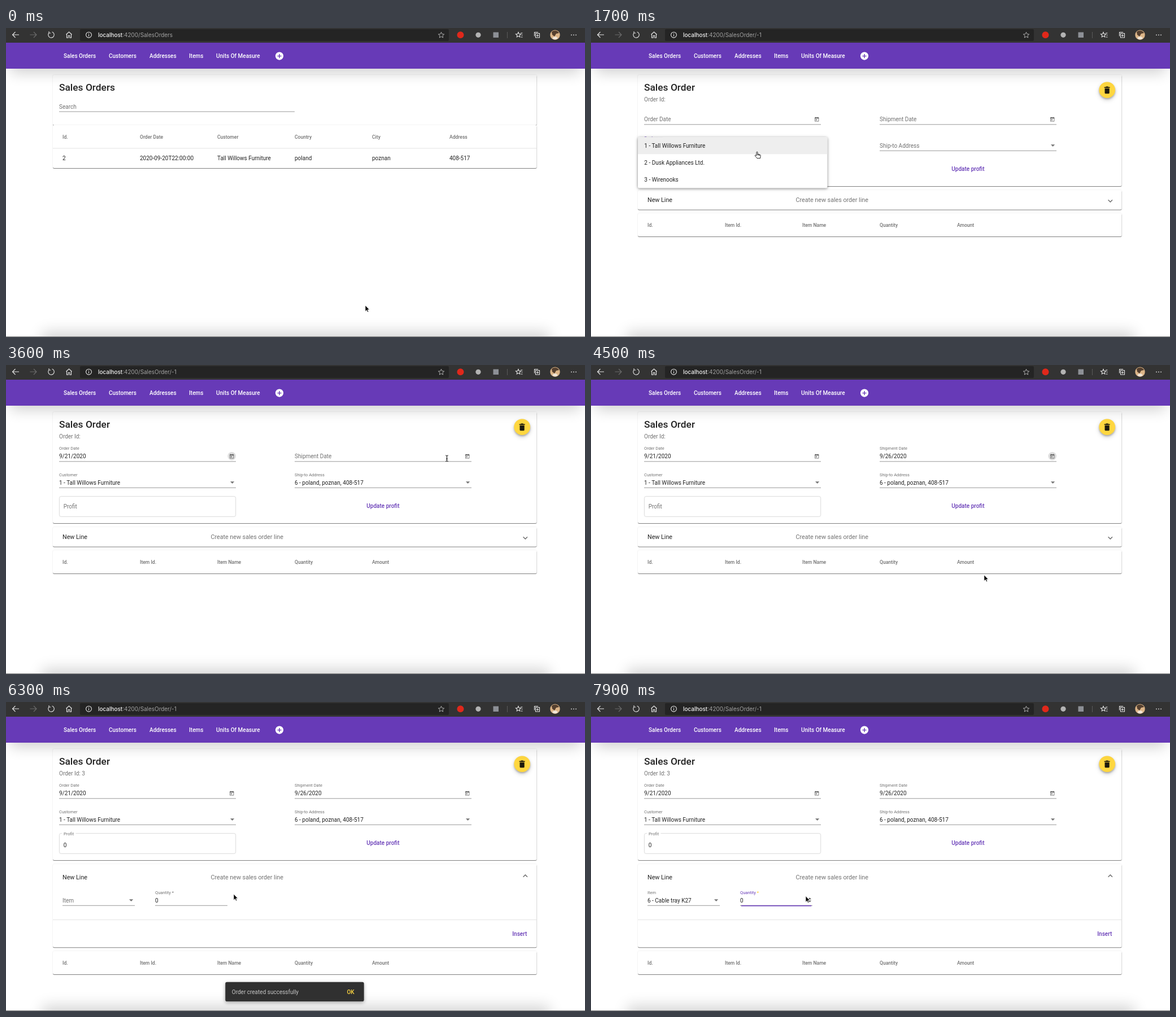
Write an HTML page that moves like this. It is 1025 px wide and 547 px high and loops after 8 s.

```html
<!DOCTYPE html>
<html lang="en">
<head>
<meta charset="utf-8">
<title>Sales orders</title>
<style>
html, body { margin: 0; width: 100%; height: 100%; overflow: hidden; background: #fff; }
svg { display: block; width: 1025px; height: 547px; }
text { font-family: Roboto, sans-serif; fill: rgba(0,0,0,.87); white-space: pre; }
.url { font-family: Inter, sans-serif; fill: #a3a3a3; }
.host { fill: #f4f4f4; font-weight: 500; }
.dim { fill: rgba(0,0,0,.56); }
.mid { font-weight: 500; }
.white { fill: #fff; }
.violet { fill: #673ab7; }
.amber { fill: #ffd740; }
.pale { fill: rgba(255,255,255,.72); }
.center { text-anchor: middle; }
.card { fill: #fff; filter: drop-shadow(0 1.4px .6px rgba(0,0,0,.46)) drop-shadow(0 .5px .9px rgba(0,0,0,.1)); }
.pop { fill: #fff; filter: drop-shadow(0 1.5px 2px rgba(0,0,0,.34)) drop-shadow(0 1px 3px rgba(0,0,0,.16)); }
.fab { filter: drop-shadow(0 2px 1.6px rgba(0,0,0,.24)) drop-shadow(0 3px 3.5px rgba(0,0,0,.18)); }
.glow { filter: blur(13px); }
.rule { fill: rgba(0,0,0,.45); }
.ripple { fill: #673ab7; display: none; transform-box: fill-box; transform-origin: center; }
.mark { fill: #757575; }
.focus .ripple { display: inline; }
.focus .small, .focus .mark { fill: #673ab7; }
.focus .star { fill: #ffc400; }
.line { fill: none; stroke: #e8e8e8; stroke-width: 1.1; }
</style>
</head>
<body>
<svg id="stage" viewBox="0 0 1025 547"></svg>
<script>
const END = 8000, STEP = 100;
const stage = document.getElementById('stage');
const client = 'Tall Willows Furniture', place = '408-517';

const text = (x, mid, s, size = 10, cls = '') =>
  `<text x="${x}" y="${mid + .355 * size}" font-size="${size}" class="${cls}">${s}</text>`;
const title = s => text(94, 104.9, s, 17.35, 'mid');
const box = (x, y, w, h, cls, more = '') =>
  `<rect x="${x}" y="${y}" width="${w}" height="${h}" class="${cls}" ${more}/>`;
const path = (d, more = '') => `<path d="${d}" ${more}/>`;
const dot = (x, y, r, fill) => `<circle cx="${x}" cy="${y}" r="${r}" fill="${fill}"/>`;
const on = (times, ...parts) => `<g data-on="${times}">${parts.join('')}</g>`;
const popup = (from, to, ...parts) => `<g data-on="${from} ${to + STEP}" data-pop="${from} ${to}">${parts.join('')}</g>`;
const cells = (names, mid, size = 8.57, cls = 'dim mid') =>
  names.map((s, i) => text(100 + 137 * i, mid, s, size, cls)).join('');

function field({ x, w, base, label, value, floatAt, valueAt = floatAt, focus = '', arrow = true, star = '' }) {
  const mark = star && `<tspan class="star"> ${star}</tspan>`;
  return `<g data-focus="${focus}">` +
    on(`0 ${floatAt}`, text(x, base - 9.5, label, 10, 'dim')) +
    on(`${floatAt} ${END}`, text(x, base - 23.5, label + mark, 7.5, 'dim small')) +
    on(`${valueAt} ${END}`, text(x, base - 9.5, value)) +
    box(x, base - .7, w, .9, 'rule') + box(x, base - .6, w, 1.6, 'ripple') +
    (arrow ? path(`M${x + w - 10} ${base - 11.2}h7.2l-3.6 3.7z`, 'class="mark"') : '') + '</g>';
}

function options(x, y, w, from, to, names, hover) {
  return popup(from, to,
    box(x, y, w, 30 * names.length, 'pop', 'rx="2.5"'),
    box(x, y + 30 * hover, w, 30, '', 'fill="#eee"'),
    ...names.map((s, i) => text(x + 11.3, y + 15.5 + 30 * i, s)));
}

function calendar(x, day, from, to) {
  const col = i => x + 20 + 28.57 * i;
  let s = box(x, 172, 211.4, 253, 'pop', 'rx="2.5"') +
    text(x + 17, 200, 'SEP 2020', 10, 'mid') +
    path(`M${x + 67} 198.5h7l-3.5 3.6z`, 'class="mark"') +
    path(`M${x + 163} 196.5l-3.5 3.5 3.5 3.5M${x + 188} 196.5l3.5 3.5-3.5 3.5`, 'fill="none" stroke="#666" stroke-width="1.3"') +
    box(x, 241, 211.4, .7, '', 'fill="#e0e0e0"') +
    text(x + 14, 261, 'SEP', 9.3, 'dim mid');
  [...'SMTWTFS'].forEach((d, i) => s += text(col(i), 231, d, 7.86, 'dim center'));
  for (let d = 1; d <= 30; d++) {
    const cx = col((d + 1) % 7), cy = 290 + 28.57 * Math.floor((d + 1) / 7);
    if (d === day) s += dot(cx, cy, 13, '#673ab7');
    s += text(cx, cy, d, 9.3, d === day ? 'center white' : 'center');
  }
  return popup(from, to, s);
}

const toggle = (x, times) => on(times, dot(x, 161.3, 7.3, '#dedede')) +
  path(`M${x - 3.2} 159h6.4v6.2h-6.4z`, 'fill="none" stroke="#666" stroke-width=".8"') +
  path(`M${x - 3.6} 158.3h7.2v1.9h-7.2zM${x - 2.4} 157.4h.9v1h-.9zM${x + 1.5} 157.4h.9v1h-.9zM${x - 1.9} 161.5h2v2h-2z`, 'fill="#666"');

const url = s => `<text x="163" y="16" font-size="9.95" class="url"><tspan class="host">localhost</tspan>:4200/${s}</text>`;

const browser = box(0, 0, 1025, 26, '', 'fill="#333"') +
  box(131, 2, 653, 21, '', 'rx="2" fill="#242424"') +
  on('0 700', url('SalesOrders')) + on(`700 ${END}`, url('SalesOrder/-1')) +
  path('M23 12H11.5m5-5-5 5 5 5M76.5 8.2a5.2 5.2 0 1 0 5.2-1.1M76 6v3h3.2M106.5 11.5l5-4.5 5 4.5M107.5 11v6.2h2.7v-3.7h2.6v3.7h2.7V11', 'class="line"') +
  path('M42.5 12H54m-5-5 5 5-5 5', 'class="line" style="stroke:#6d6d6d"') +
  '<circle cx="146.5" cy="12.2" r="4.9" class="line"/>' + path('M146.5 11.5v3.3M146.5 9.3v1.2', 'class="line"') +
  path('M770.5 7.3l1.5 3.4 3.7.4-2.8 2.4.8 3.6-3.2-1.9-3.2 1.9.8-3.6-2.8-2.4 3.7-.4z', 'class="line" style="stroke:#bbb;stroke-width:.9"') +
  dot(804.5, 12.3, 6, '#e0281b') + dot(836, 12.3, 4.6, '#b3b3b3') +
  box(862.5, 7.5, 9.5, 9.5, '', 'fill="#8d9096"') + box(887, 7, .8, 11, '', 'fill="#666"') +
  path('M907 7.5l1.3 3 3.2.3-2.3 2.2.5 3-2.7-1.6-2.7 1.6.6-3-2.4-2.2 3.2-.3zM911 9h3.5M912.5 12.5h2M911.5 16h3', 'class="line"') +
  path('M937.5 9.5h7v7.5h-7zM935.5 14.5V7.5h6.5M941 11v4.5M938.8 13.2h4.4', 'class="line"') +
  dot(972, 12.2, 8.7, '#dcb588') + path('M966 7c4-4 11-3 13 2l-5 1-3 5-4-3z', 'fill="#55402f"') + path('M967 18c3-4 7-4 10 0-3 3-7 3-10 0z', 'fill="#f0e6d8"') +
  [1001, 1005, 1009].map(x => dot(x, 12.3, .9, '#eee')).join('');

const nav = box(0, 26, 1025, 46, 'violet') +
  [[102, 'Sales Orders'], [182, 'Customers'], [254, 'Addresses'], [324, 'Items'], [372, 'Units Of Measure']]
    .map(([x, s]) => text(x, 49.4, s, 10, 'mid white')).join('') +
  dot(484, 49.6, 7.1, '#fff') + path('M484 46v7.2M480.4 49.6h7.2', 'stroke="#673ab7" stroke-width="1.45"');

const list = on('0 700',
  box(83, 83, 856.5, 89, 'card', 'rx="2.5"'), box(83, 172, 856.5, 76, 'card', 'rx="2.5"'),
  title('Sales Orders'), text(94, 139, 'Search', 10, 'dim'),
  box(94, 147.6, 417, .9, 'rule'), box(83, 212.6, 856.5, .8, '', 'fill="#dcdcdc"'),
  cells(['Id.', 'Order Date', 'Customer', 'Country', 'City', 'Address'], 192.7),
  cells(['2', '2020-09-20T22:00:00', client, 'poland', 'poznan', place], 230.7, 10, ''));

const head = box(83, 83, 856.5, 197, 'card', 'rx="2.5"') + title('Sales Order') +
  on('0 5000', text(94, 126.5, 'Order Id:', 10, 'dim')) + on(`5000 ${END}`, text(94, 126.5, 'Order Id: 3', 10, 'dim')) +
  '<circle cx="913.7" cy="109.7" r="14.3" class="amber fab"/>' +
  path('M909.5 106.7h8.2v8q0 1.5-1.5 1.5h-5.2q-1.5 0-1.5-1.5zM908.6 104.5h2.5l.8-.9h3.4l.8.9h2.5v1.4h-10z', 'fill="#1d1a0c"') +
  field({ x: 94, w: 313, base: 171.1, label: 'Order Date', value: '9/21/2020', floatAt: 3200, arrow: false }) +
  field({ x: 511, w: 313, base: 171.1, label: 'Shipment Date', value: '9/26/2020', floatAt: 4200, arrow: false }) +
  toggle(399.7, '3200 3800') + toggle(816.7, '4200 4900') +
  field({ x: 94, w: 313, base: 217.5, label: 'Customer', value: '1 - ' + client, floatAt: 1400, valueAt: 1900, focus: '1400 2100 4900 5500' }) +
  field({ x: 511, w: 313, base: 217.5, label: 'Ship-to Address', value: `6 - poland, poznan, ${place}`, floatAt: 2100, valueAt: 2300, focus: '2100 2800' }) +
  box(94.4, 232.6, 312.3, 35.8, '', 'rx="3" fill="none" stroke="#d6d6d6" stroke-width=".9"') +
  on('0 5000', text(101.7, 250, 'Profit', 10, 'dim')) +
  on(`5000 ${END}`, box(99, 231, 24.5, 3, 'white'), text(102, 233, 'Profit', 7.5, 'dim'), text(101.7, 253, '0')) +
  text(638.3, 249.5, 'Update profit', 10, 'mid violet');

const line = box(83, 287, 856.5, 34.5, 'card', 'id="line" rx="2.5"') +
  on('4900 5500', box(83, 287, 856.5, 34.5, '', 'rx="2.5" fill="#ededed"')) +
  `<g id="lineHead">${text(100, 304, 'New Line', 10.71)}${text(362.5, 304, 'Create new sales order line', 10.71, 'dim')}</g>` +
  path('M-3.7-1.9 0 1.8 3.7-1.9', 'id="chevron" fill="none" stroke="#666" stroke-width="1.3"') +
  '<clipPath id="clip"><rect id="clipBox" x="83" y="325" width="857"/></clipPath><g id="lineBody" clip-path="url(#clip)">' +
  field({ x: 100, w: 128, base: 360.5, label: 'Item', value: '6 - Cable tray K27', floatAt: 6700, valueAt: 7000, focus: '6700 7700' }) +
  field({ x: 264, w: 128, base: 360.5, label: 'Quantity', value: '0', floatAt: 0, focus: `7700 ${END}`, arrow: false, star: '*' }) +
  on(`7700 ${END}`, path('M384.5 349.3h5.4l-2.7-3zM384.5 351.5h5.4l-2.7 3z', 'fill="#555"')) +
  box(83, 385, 856.5, .8, '', 'fill="#dedede"') + text(896.3, 410, 'Insert', 10, 'mid violet') + '</g>' +
  `<g id="table">${box(83, 328, 856.5, 41, 'card', 'rx="2.5"')}${cells(['Id.', 'Item Id.', 'Item Name', 'Quantity', 'Amount'], 348.5)}</g>`;

const snack = `<g id="snack">${box(388.3, 495.7, 245.4, 34.3, '', 'rx="2.8" fill="#303030" style="filter:drop-shadow(0 2px 3px rgba(0,0,0,.35))"')}` +
  text(399.8, 513, 'Order created successfully', 10, 'pale') + text(603.4, 513, 'OK', 10, 'mid amber') + '</g>';

const cursors = {
  arrow: path('M0 0v10.7l2.5-2.3 1.6 3.6 1.7-.8-1.6-3.4h3.2z', 'fill="#000" stroke="#fff" stroke-width=".7"'),
  hand: path('M-1 .8C-.3-.3 1 0 1 1.2V4.3l3.5.8c1.4.3 1.9 1 1.7 2.4L5.5 11.7H0C-1 9.8-2.8 8.6-3.7 7.1-4 6-2.6 5.5-1.9 6.3l.9.8zM1 4.3v2M2.8 4.8v2M4.5 5.2v1.8', 'fill="#fff" stroke="#000" stroke-width=".85"'),
  beam: path('M-2.2-5.3q2.2 0 2.2 1.3V4q0 1.3-2.2 1.3M2.2-5.3Q0-5.3 0-4V4Q0 5.3 2.2 5.3M-1.3.8h2.6', 'fill="none" stroke="#000" stroke-width="1"')
};
const hand = '500 900 1300 2000 2100 2400 2700 3300 3800 4300 4800 5700 6500 7300';
const beam = '3500 3800 7500 7700';

stage.innerHTML = list + on(`700 ${END}`, head, line) +
  box(64, 538, 898, 40, 'glow', 'opacity=".17"') + box(0, 546, 1025, 1, '', 'fill="#777"') +
  box(8, 40, 1009, 39, 'glow', 'opacity=".19"') + browser + nav +
  options(83, 193.3, 335.4, 1400, 1900, ['1 - ' + client, '2 - Dusk Appliances Ltd.', '3 - Wirenooks'], 0) +
  options(500, 193.3, 335.4, 2100, 2300, [`6 - poland, poznan, ${place}`], 0) +
  calendar(94, 21, 2800, 3200) + calendar(511, 26, 3800, 4200) +
  options(88.7, 336, 150.6, 6700, 7000, ['1 - Desk lamp', '3 - Wall clock', '4 - Paper bin', '6 - Cable tray K27'], 3) +
  snack + '<g id="cursor"></g>';

const track = [
  [0, 636, 491], [600, 484, 49], [800, 484, 49], [1400, 300, 208], [1700, 294, 219], [1900, 294, 213],
  [2100, 640, 207], [2300, 600, 207], [2500, 446, 160], [2700, 399, 161], [2800, 399, 161], [3200, 142, 376],
  [3300, 142, 376], [3600, 780.5, 165.3], [3800, 816, 161], [3900, 816, 161], [4200, 702, 376], [4400, 702, 376],
  [5100, 592, 297.3], [5400, 592, 297.3], [6300, 403, 340], [6600, 165, 350], [6700, 165, 350], [7000, 150, 446],
  [7200, 150, 446], [7700, 380, 343.5], [END, 380, 343.5]
];

const id = name => document.getElementById(name);
const all = key => [...stage.querySelectorAll(`[data-${key}]`)].map(el => [el, el.dataset[key].split(' ').map(Number)]);
const timed = all('on'), pops = all('pop'), focusable = all('focus');
const clamp = v => Math.max(0, Math.min(1, v));
const ease = v => v * v * (3 - 2 * v);
const set = (el, name, v) => el.setAttribute(name, v);

// Start of the window that holds t, or -1.
function since(spans, t) {
  for (let i = 0; i + 1 < spans.length; i += 2) if (t >= spans[i] && t < spans[i + 1]) return spans[i];
  return -1;
}
const within = (s, t) => since(s.split(' ').map(Number), t) >= 0;

function pointer(t) {
  const i = track.findIndex(p => p[0] > t), [a, x, y] = track[i - 1], [b, u, v] = track[i];
  const k = ease((t - a) / (b - a));
  return [x + (u - x) * k, y + (v - y) * k];
}

let shape = '';
function draw(t) {
  for (const [el, spans] of timed) el.style.display = since(spans, t) < 0 ? 'none' : '';
  for (const [el, [from, to]] of pops) el.style.opacity = t === from ? .6 : t === to ? .4 : 1;
  for (const [el, spans] of focusable) {
    const start = since(spans, t);
    el.classList.toggle('focus', start >= 0);
    el.querySelector('.ripple').style.transform = `scaleX(${1 - .22 * (1 - clamp((t - start) / 230))})`;
  }

  const open = ease(clamp((t - 5450) / 225));
  set(id('line'), 'height', 34.5 + 112.8 * open);
  set(id('clipBox'), 'height', Math.max(0, 112.8 * open - 4));
  set(id('lineHead'), 'transform', `translate(0 ${6 * open})`);
  set(id('chevron'), 'transform', `translate(919.3 ${306.2 + 1.6 * open}) rotate(${180 * open})`);
  set(id('table'), 'transform', `translate(0 ${113 * open})`);
  id('lineBody').style.display = open ? '' : 'none';

  const grow = t < 5100 ? .88 : t < 5200 ? .985 : 1;
  id('snack').style.display = t >= 5000 && t < 7100 ? '' : 'none';
  id('snack').style.opacity = t === 5000 ? .6 : t === 7000 ? .4 : 1;
  set(id('snack'), 'transform', `translate(511 513) scale(${grow}) translate(-511 -513)`);

  const kind = within(hand, t) ? 'hand' : within(beam, t) ? 'beam' : 'arrow';
  if (kind !== shape) id('cursor').innerHTML = cursors[shape = kind];
  set(id('cursor'), 'transform', `translate(${pointer(t).join(' ')})`);
}

let last = -1;
function tick() {
  const t = Math.floor(performance.now() % END / STEP) * STEP;
  if (t !== last) draw(last = t);
  requestAnimationFrame(tick);
}
tick();
</script>
</body>
</html>
```
